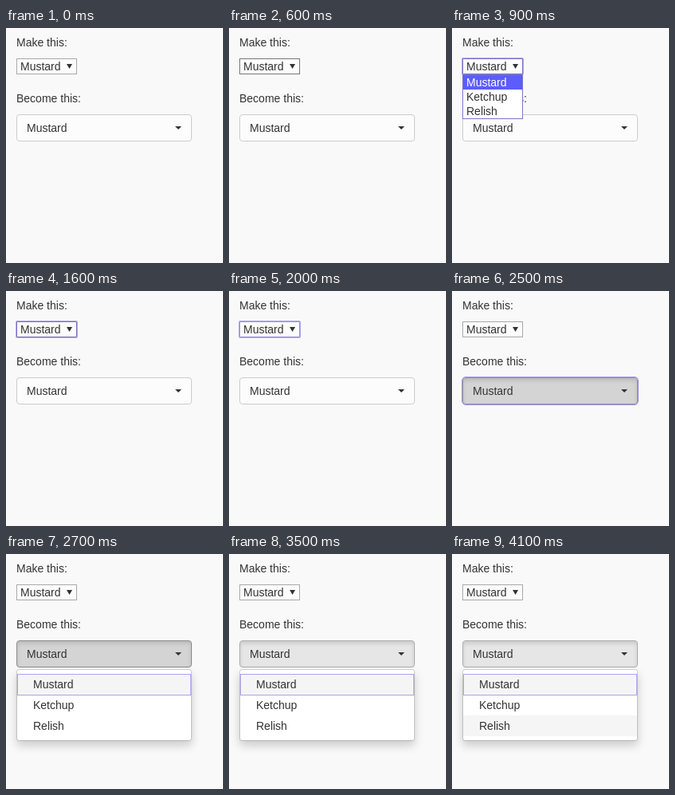
These frames come from a looping animation (272 px wide and 294 px high, 5300 ms). An HTML page:

```html
<!DOCTYPE html>
<html lang="en">
<head>
<meta charset="utf-8">
<title>Select to dropdown</title>
<style>
  * { box-sizing: border-box; }
  html, body { margin: 0; width: 100%; height: 100%; overflow: hidden; }
  body {
    background: #f9f9f9;
    color: #333;
    font: 14px/20px "Liberation Sans", Arial, sans-serif;
    cursor: default;
  }
  #stage { position: absolute; left: 0; top: 0; width: 272px; height: 294px; overflow: hidden; }
  #stage > * { position: absolute; left: 13px; }
  .caption { white-space: nowrap; }

  .select {
    top: 38px; width: 76px; height: 20px; padding-left: 4px;
    border: 1px solid #a9a9a9; background: #fcfcfc; line-height: 18px;
  }
  .select svg { position: absolute; left: 62px; top: 6px; }
  .select-hover .select { border-color: #777; }
  .select-focus .select {
    border-color: #968be4;
    box-shadow: 0 0 0 1px rgba(112, 92, 240, .5);
    border-radius: 1px;
  }
  .select-hover.select-focus .select { border-color: #786dc4; }

  .list {
    top: 58px; width: 76px; height: 56px; z-index: 2; display: none;
    border: 1px solid #7b78c8; background: #fff; line-height: 18px;
  }
  .list div { padding-left: 4px; }
  .list div:first-child { background: #5c5cff; color: #fff; }
  .list-open .list { display: block; }

  .button {
    top: 108px; width: 220px; height: 34px; padding: 6px 12px;
    border: 1px solid #ccc; border-radius: 4px; background: #fcfcfc;
  }
  .button i {
    position: absolute; right: 12px; top: 14px;
    border: 4px solid transparent; border-top-color: #333; border-bottom: 0;
  }
  .button-hover .button { background: #e6e6e6; border-color: #adadad; }
  .button-down .button {
    background: #e6e6e6; border-color: #adadad;
    box-shadow: inset 0 3px 5px rgba(0, 0, 0, .125);
  }
  .button-down.button-hover .button { background: #d4d4d4; border-color: #8c8c8c; }
  .button-focus .button { outline: 1px solid #a99bed; }

  .menu {
    top: 144px; width: 220px; height: 90px; padding: 5px 0; display: none;
    border: 1px solid #ccc; border-color: rgba(0, 0, 0, .15); border-radius: 4px;
    background: #fff; background-clip: padding-box;
    box-shadow: 0 6px 12px rgba(0, 0, 0, .175);
  }
  .menu-open .menu { display: block; }
  .menu div { position: relative; height: 26px; padding: 3px 20px; }
  .menu div:first-child { background: #f5f5f5; }
  .menu div:first-child::after {
    content: ""; position: absolute; inset: 0 0 -1px; border: 1px solid #afa1ee;
  }
  .hover-2 .menu div:nth-child(2), .hover-3 .menu div:nth-child(3) { background: #f5f5f5; }
</style>
</head>
<body>
<div id="stage">
  <div class="caption" style="top:8px">Make this:</div>
  <div class="select">Mustard<svg width="7" height="6"><path d="M0 0H7L3.5 6Z" fill="#333"/></svg></div>
  <div class="list"><div>Mustard</div><div>Ketchup</div><div>Relish</div></div>
  <div class="caption" style="top:78px">Become this:</div>
  <div class="button">Mustard<i></i></div>
  <div class="menu"><div>Mustard</div><div>Ketchup</div><div>Relish</div></div>
</div>
<script>
  const LOOP = 5300;
  const steps = [
    [0, ""],
    [600, "select-hover"],
    [800, "select-hover select-focus"],
    [900, "select-hover select-focus list-open"],
    [1600, "select-hover select-focus"],
    [2000, "select-focus"],
    [2100, "select-focus button-hover"],
    [2500, "button-hover button-down button-focus"],
    [2700, "button-hover button-down menu-open"],
    [3500, "button-down menu-open"],
    [3700, "button-down menu-open hover-2"],
    [4100, "button-down menu-open hover-3"]
  ];
  const stage = document.getElementById("stage");
  const start = performance.now();

  function draw() {
    const t = (performance.now() - start) % LOOP;
    const state = steps.findLast(([at]) => at <= t)[1];
    if (stage.className !== state) stage.className = state;
    requestAnimationFrame(draw);
  }
  draw();
</script>
</body>
</html>
```
